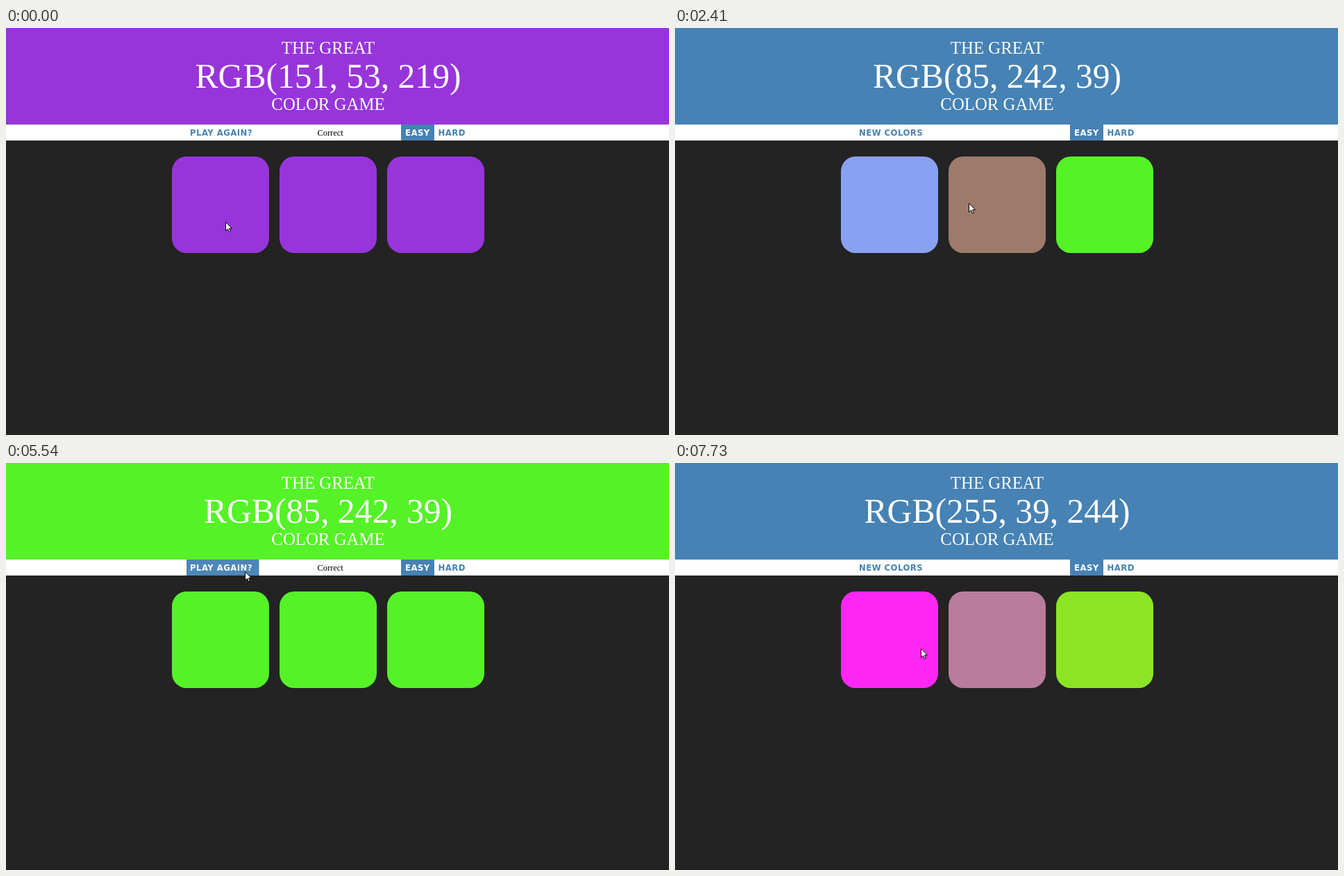
An HTML page for the animation above (8000 ms loop, 955 by 586 pixels).

```html
<!DOCTYPE html>
<html lang="en">
<head>
<meta charset="utf-8">
<title>Color game</title>
<style>
  html, body { margin: 0; width: 100%; height: 100%; overflow: hidden; background: #232323; }
  svg { display: block; width: 955px; height: 586px; }
  .title { font: 24.8px "Liberation Serif", serif; fill: #fff; text-anchor: middle; }
  .big { font-size: 49.6px; }
  .label { font: bold 11.7px "DejaVu Sans", sans-serif; letter-spacing: .45px; fill: #4682b4; }
  #message { font: 12.4px "Liberation Serif", serif; text-anchor: middle; }
</style>
</head>
<body>
<svg viewBox="0 0 955 586">
  <rect width="955" height="586" fill="#232323"/>
  <rect id="header" width="955" height="139"/>
  <text class="title" x="464" y="37">THE GREAT</text>
  <text class="title big" id="goal" x="464" y="86"></text>
  <text class="title" x="464" y="118">COLOR GAME</text>
  <rect y="139" width="955" height="23" fill="#fff"/>
  <rect id="button" x="260" y="139" width="104.5" height="23"/>
  <text class="label" id="action" x="265" y="155"></text>
  <text id="message" x="467" y="155"></text>
  <rect x="569" y="139" width="48" height="23" fill="#4682b4"/>
  <text class="label" x="575" y="155" style="fill:#fff">EASY</text>
  <text class="label" x="622.6" y="155">HARD</text>
  <g id="squares"></g>
  <path id="cursor" d="M0 0V12.5L3 9.8 5 14.3 6.9 13.5 5 9.2H9Z" fill="#fff" stroke="#000"/>
</svg>
<script>
const $ = id => document.getElementById(id);
const LOOP = 8000, FADE = 600, HOVER_FADE = 300;
const BACK = [35, 35, 35], STEEL = [70, 130, 180], WHITE = [255, 255, 255];
const PURPLE = [151, 53, 219], GREEN = [85, 242, 39], PINK = [255, 39, 244];
const BLUE = [137, 161, 242], BROWN = [158, 122, 107], MAUVE = [186, 124, 157], LIME = [139, 229, 36];

const won = (t, goal) => ({ t, goal, won: true, message: 'Correct', squares: [goal, goal, goal] });
const playing = (t, goal, squares, message = '') => ({ t, goal, squares, message });

// The game after each click, in order of time
const states = [
  won(-FADE, PURPLE),
  playing(1280, GREEN, [BLUE, BROWN, GREEN]),
  playing(2900, GREEN, [BLUE, BACK, GREEN], 'Try Again'),
  won(4300, GREEN),
  playing(5560, PINK, [PINK, MAUVE, LIME])
];

// When the pointer enters and leaves the left button
const hovers = [[1100, 1720], [5315, 5800]];

// Where the pointer turns or rests: time, x, y
const stops = [
  [0, 316, 279], [460, 316, 279],
  [1300, 315, 147], [1500, 315, 147],
  [2410, 423, 252], [2650, 456, 248], [3300, 456, 248],
  [3860, 561, 252], [4300, 590, 258],
  [5540, 344, 156], [5700, 344, 156],
  [6350, 343, 246], [7000, 424, 265], [7730, 354, 267], [LOOP, 354, 267]
];

const mix = (a, b, k) => a + (b - a) * k;
const rgb = color => `rgb(${color.join(', ')})`;
const blend = (a, b, k) => rgb(a.map((v, i) => Math.round(mix(v, b[i], k))));

// CSS "ease": cubic-bezier(.25, .1, .25, 1)
function ease(x) {
  if (x <= 0) return 0;
  if (x >= 1) return 1;
  const curve = (u, p, q) => 3 * u * (1 - u) ** 2 * p + 3 * u * u * (1 - u) * q + u ** 3;
  let low = 0, high = 1;
  for (let i = 0; i < 20; i++) {
    const mid = (low + high) / 2;
    if (curve(mid, .25, .25) < x) low = mid; else high = mid;
  }
  return curve(low, .1, 1);
}

function pointer(t) {
  const i = stops.findIndex(stop => stop[0] > t);
  const [t0, x0, y0] = stops[i - 1], [t1, x1, y1] = stops[i];
  const k = (t - t0) / (t1 - t0), smooth = k * k * (3 - 2 * k);
  return [mix(x0, x1, smooth), mix(y0, y1, smooth)];
}

const squares = [0, 1, 2].map(i => {
  const rect = document.createElementNS($('squares').namespaceURI, 'rect');
  const box = { x: 239 + 155 * i, y: 185, width: 140, height: 139, rx: 21 };
  for (const key in box) rect.setAttribute(key, box[key]);
  return $('squares').appendChild(rect);
});

function draw(t) {
  const index = states.findLastIndex(s => s.t <= t);
  const state = states[index], before = states[index - 1] || state;

  $('header').style.fill = rgb(state.won ? state.goal : STEEL);
  $('goal').textContent = rgb(state.goal).toUpperCase();
  $('action').textContent = state.won ? 'PLAY AGAIN?' : 'NEW COLORS';
  $('message').textContent = state.message;

  const fade = ease((t - state.t) / FADE);
  squares.forEach((rect, i) => rect.style.fill = blend(before.squares[i], state.squares[i], fade));

  const hover = hovers.reduce((sum, [enter, leave]) =>
    sum + ease((t - enter) / HOVER_FADE) - ease((t - leave) / HOVER_FADE), 0);
  $('button').style.fill = blend(WHITE, STEEL, hover);
  $('action').style.fill = blend(STEEL, WHITE, hover);

  const [x, y] = pointer(t).map(v => Math.round(v) + .5);
  $('cursor').setAttribute('transform', `translate(${x} ${y})`);
}

const start = performance.now();
function loop() {
  draw((performance.now() - start) % LOOP);
  requestAnimationFrame(loop);
}
loop();
</script>
</body>
</html>
```
